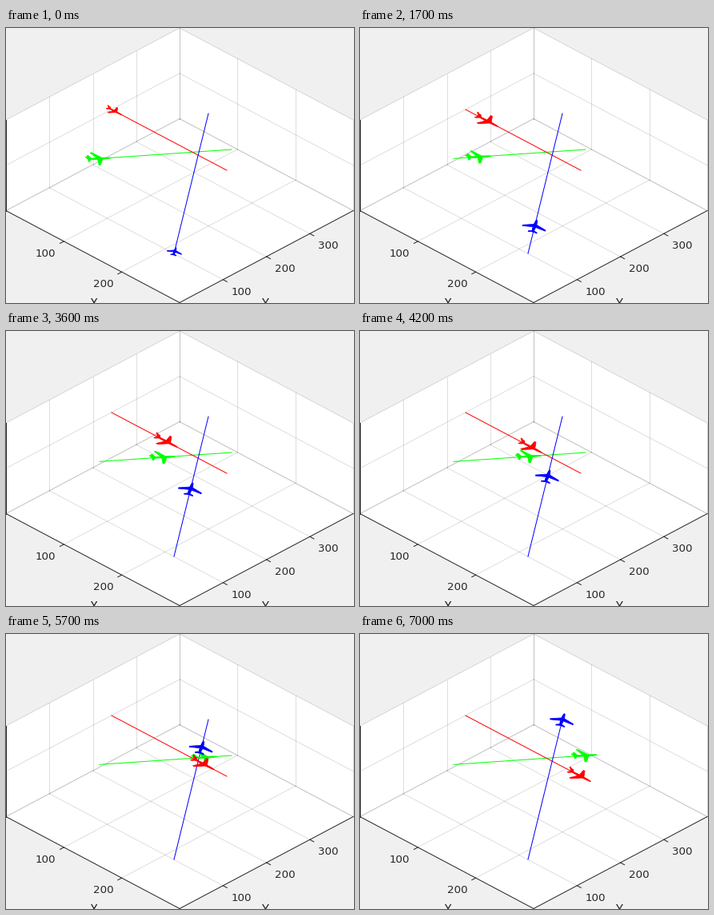
These frames come from a looping animation (435 by 344 pixels, 7100 ms). A matplotlib script:

```python
import numpy as np
import matplotlib.pyplot as plt
from matplotlib.animation import FuncAnimation
from matplotlib.patches import Polygon

W, H, DPI = 435, 344, 64
PX = 72 / DPI  # one pixel in points
FRAMES, HOLD, SETTLE = 71, 4, 5
STEPS = FRAMES - 1 - HOLD
INK = "#262626"

# Axis limits and the orthographic projection to screen pixels
XMAX, YMAX, ZMAX, TICK = 300, 400, 200, 100
ORIGIN = np.array([0, 228.5])
PROJ = np.array([[217 / XMAX, 115 / XMAX],
                 [217 / YMAX, -115 / YMAX],
                 [0, -113.5 / ZMAX]])

fig = plt.figure(figsize=(W / DPI, H / DPI), dpi=DPI, facecolor="#f0f0f0")
ax = fig.add_axes([0, 0, 1, 1])
ax.set_xlim(0, W)
ax.set_ylim(H, 0)
ax.axis("off")


def pt(x, y, z=0):
    return ORIGIN + np.array([x, y, z]) @ PROJ


def line(p, q, color=INK, z=2, **kw):
    ax.plot([p[0], q[0]], [p[1], q[1]], color=color, lw=PX, zorder=z, **kw)


def grid(p, q):
    line(p, q, "black", 1, alpha=0.13)


def label(pos, text, points=10):
    size = points * 96 / 72 * PX
    ax.text(*pos, text, color=INK, fontsize=size, ha="center",
            va="baseline", family="DejaVu Sans")


def draw_box():
    hull = [pt(0, 0), pt(XMAX, 0), pt(XMAX, YMAX),
            pt(XMAX, YMAX, ZMAX), pt(0, YMAX, ZMAX), pt(0, 0, ZMAX)]
    ax.add_patch(Polygon(hull, fc="white", ec="none", zorder=0))

    for x in range(0, XMAX + 1, TICK):
        grid(pt(x, YMAX), pt(x, YMAX, ZMAX))
        if x < XMAX:
            grid(pt(x, 0), pt(x, YMAX))
    for y in range(TICK, YMAX + 1, TICK):
        grid(pt(0, y), pt(0, y, ZMAX))
        grid(pt(0, y), pt(XMAX, y))
    for z in range(0, ZMAX + 1, TICK):
        grid(pt(0, YMAX, z), pt(XMAX, YMAX, z))
        grid(pt(0, YMAX, z), pt(0, 0, z))

    corner = pt(XMAX, 0)
    for end in pt(0, 0), pt(XMAX, YMAX):
        line(corner, end)
    line(pt(0, 0), pt(0, 0, ZMAX))

    gap = np.array([23, 18.8])
    for x in range(TICK, XMAX, TICK):
        line(pt(x, 0), pt(x, -9))
        label(pt(x, 0) + gap * [-1, 1], str(x))
    for y in range(TICK, YMAX, TICK):
        line(pt(XMAX, y), pt(XMAX + 7, y))
        label(pt(XMAX, y) + gap, str(y))
    label((109.5, 349.5), "X", 11)
    label((323.5, 349.5), "Y", 11)


def swept(lead, chord, sweep, tip, span):
    """Half a swept wing as (along, out) points."""
    back = lead - sweep
    return np.array([[lead, 0], [back, span], [back - tip, span], [lead - chord, 0]])


NOSE = 17
turn = np.linspace(0, 2 * np.pi, 24)
fuselage = np.column_stack([NOSE * np.cos(turn), 1.9 * np.sin(turn)])
flat = [fuselage]
for half in swept(5, 8, 10, 2.5, 16), swept(-13, 4, 4, 2, 6):
    flat += [half, half * [1, -1]]
# Parts as (forward, right, up) points; the last one is the tail fin
PARTS = [np.insert(p, 2, 0, axis=1) for p in flat]
PARTS.append(np.insert(swept(-11, 6, 6, 2, 8), 1, 0, axis=1))


class Plane:
    """Flies level on a fixed bearing; grows from its first size to full."""

    def __init__(self, color, start, end, bearing, size, z):
        self.start, self.end, self.size = np.array(start), np.array(end), size
        c, s = np.cos(np.radians(bearing)), np.sin(np.radians(bearing))
        axes = np.array([[c, s, 0], [s, -c, 0], [0, 0, 1]]) @ PROJ
        self.shapes = [part @ axes for part in PARTS]
        self.nose = NOSE * axes[0]
        line(start, end, color, 3)
        self.patches = [
            ax.add_patch(Polygon(shape, fc=color, ec=color, lw=0.8 * PX,
                                 joinstyle="round", zorder=z))
            for shape in self.shapes]

    def move(self, step):
        pos = self.start + (self.end - self.start) * step / STEPS
        size = self.size + (1 - self.size) * min(step / SETTLE, 1)
        pos = pos + self.nose * (1 - size)  # the nose stays in place
        for patch, shape in zip(self.patches, self.shapes):
            patch.set_xy(pos + size * shape)


draw_box()
planes = [
    Plane("#00ff00", (117, 163.3), (282, 152), 59, 1, 4),
    Plane("#ff0000", (132, 102), (276, 178), 0, 0.65, 5),
    Plane("#0000ff", (210, 282), (253, 107), 117, 0.62, 6),
]


def update(frame):
    step = max(0, frame - HOLD)
    for plane in planes:
        plane.move(step)
    return []


anim = FuncAnimation(fig, update, frames=FRAMES, interval=100,
                     init_func=lambda: update(0), repeat=True, repeat_delay=0)
plt.show()
```
